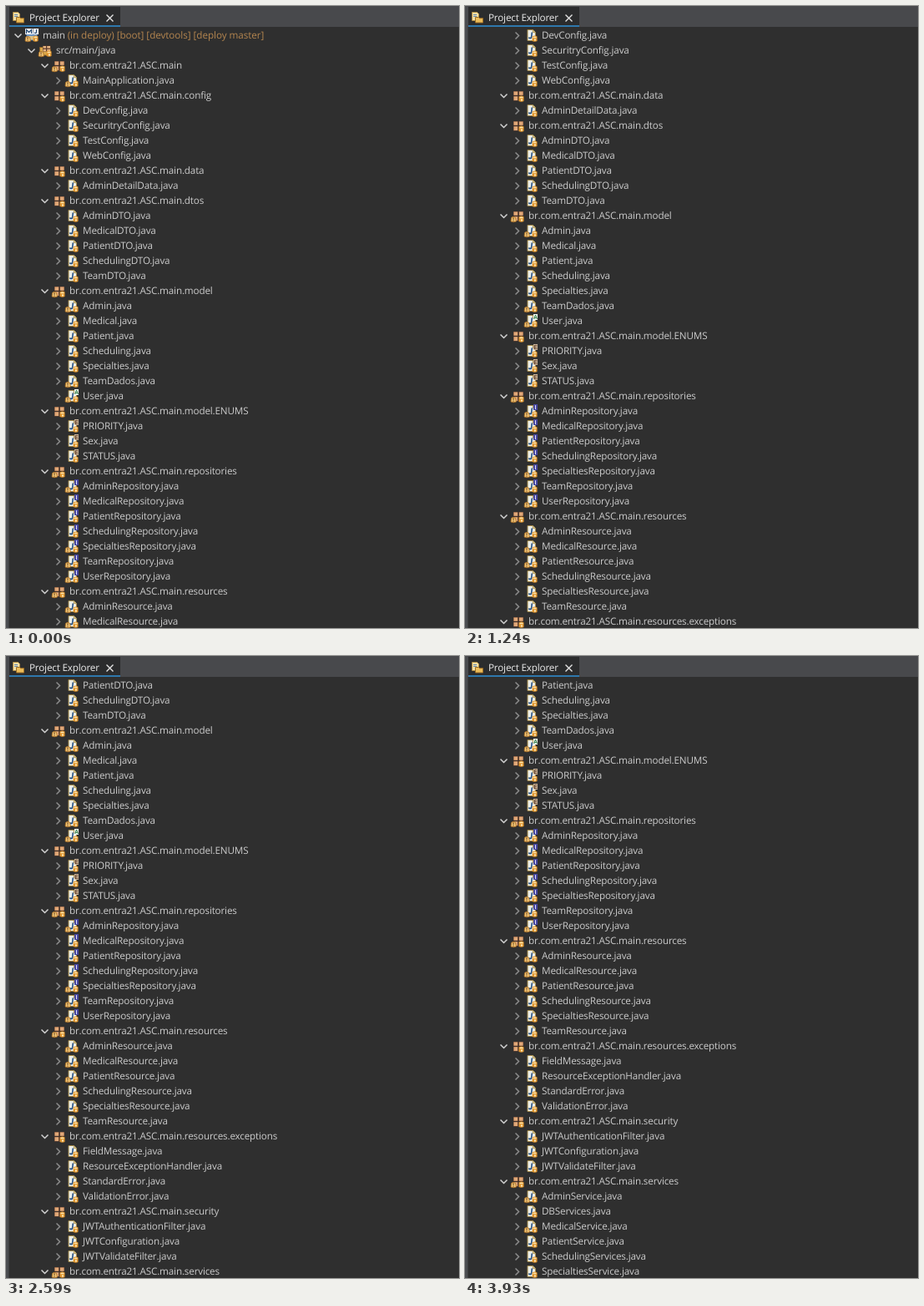
An HTML page for the animation above (8000 ms loop, 543 by 745 pixels).

```html
<!DOCTYPE html>
<html lang="en">
<head>
<meta charset="utf-8">
<title>Project Explorer</title>
<style>
  html, body { margin: 0; width: 100%; height: 100%; overflow: hidden; background: #2f2f2f; }
  svg { display: block; }
  text {
    font: 11.7px "Open Sans", "Noto Sans", sans-serif;
    letter-spacing: -.17px;
    text-rendering: geometricPrecision;
    fill: #cbcbcb;
    white-space: pre;
  }
  .decoration { fill: #b3854f; letter-spacing: -.06px; }
  .badge { font: bold 7px "Liberation Sans", Arial, sans-serif; letter-spacing: 0; }
  .open, .closed { fill: none; stroke: #d2d2d2; stroke-width: 1.5; }
  .closed { stroke: #8c8c8c; }
</style>
</head>
<body>
<svg width="543" height="745" viewBox="0 0 543 745">
  <defs>
    <clipPath id="view"><path d="M4 26H543V745H4z"/></clipPath>

    <g id="repo">
      <path d="M9.5 9.5q3-2 6 0v5.5q-3 1.5-6 0z" fill="#e0962f"/>
      <path d="M10.5 10q2-1 4 0v1.3h-4z" fill="#fbe3ac"/>
      <path d="M12 12.5h1.8v2H12z" fill="#fff0c8"/>
    </g>
    <g id="warning">
      <path d="M.5 10.5q2.5-2.5 5 0l1 4.5q-3.5 1.5-6.5 0z" fill="#f3c877" stroke="#a8691f" stroke-width=".8"/>
      <path d="M3 10.3v2.4m0 .8v1.2" stroke="#69401a" stroke-width="1.1"/>
    </g>
    <g id="package" fill="#e0a878">
      <path d="M3 3h12v11.5H3z" fill="#6e4431"/>
      <path d="M3.5 3.5h4.7v4.2H3.5zm6.3 0h4.7v4.2H9.8zM3.5 9.3h4.7v4.7H3.5zm6.3 0h4.7V14H9.8z"/>
      <path d="M9 2.5v12M2.5 8.5h13" stroke="#3b2e29" stroke-width="1"/>
    </g>
    <g id="file">
      <path d="M4 1.5h6.3l3.2 3.2v9.8H4z" fill="#eceee8" stroke="#a08748"/>
      <path d="M10.3 1.5v3.2h3.2" fill="#e6cf8a" stroke="#a08748" stroke-width=".8"/>
      <path d="M9.3 4.5L8.7 10q-.3 1.6-1.7 1.6-1.2 0-1.5-1" fill="none" stroke="#234f83" stroke-width="1.6"/>
    </g>
    <g id="source">
      <path d="M1.5 4.5h5l1.2 1.5h6.8v8h-13z" fill="#d9a84c" stroke="#8e6425"/>
      <path d="M5 2.5h9.5v7H5z" fill="#5b3a2b"/>
      <path d="M5.5 3H9v2.5H5.5zm4.7 0h3.8v2.5h-3.8zM5.5 6.7H9v2.5H5.5zm4.7 0h3.8v2.5h-3.8z" fill="#e6b582"/>
    </g>
    <g id="project">
      <path d="M1.5 6.5h5l1-1.5h7v9h-13z" fill="#6f94bd" stroke="#3d5f8a"/>
      <path d="M2 9h12v4.5H2z" fill="#d9c18a"/>
      <path d="M0 0h9v7H0zM9.5 0H16v7H9.5z" fill="#f4f6fa"/>
      <path d="M1.5 6V1.5l3 3 3-3V6M13.5 1v3.2q0 1.5-2.5 1" fill="none" stroke="#23476f" stroke-width="1.2"/>
    </g>
  </defs>

  <path d="M0 0H543V745H0z" fill="#2f2f2f"/>
  <path d="M0 0H543V25H0z" fill="#48494c"/>
  <path d="M0 0H3.5V745H0z" fill="#4a4c4f"/>
  <path d="M4 1H137V25H4z" fill="#2b2c2d"/>
  <path d="M4 23H137V25H4z" fill="#2f78ad"/>
  <path d="M8.5 7.5h6l2 2v8h-8z" fill="#f3dfa4" stroke="#b08b42"/>
  <path d="M10 10.5h4m-4 2h4" stroke="#6288b4"/>
  <path d="M12.5 13.5h4l1 1.2h4v5.3h-9z" fill="#edbd5a" stroke="#9a6d26"/>
  <text x="28" y="18" style="fill:#ececec">Project Explorer</text>
  <path d="M120.5 10.5l8 8m0-8l-8 8" stroke="#e2e2e2" stroke-width="1.4"/>

  <g clip-path="url(#view)"><g id="tree"></g></g>
</svg>
<script>
const ROW = 18, LOOP = 8000;
const PREFIX = 'br.com.entra21.ASC.main';

// A leading "!" marks an item that carries a warning.
const packages = `
!: !MainApplication
.config: DevConfig SecuritryConfig TestConfig WebConfig
.data: AdminDetailData
.dtos: AdminDTO MedicalDTO PatientDTO SchedulingDTO TeamDTO
!.model: !Admin Medical Patient Scheduling Specialties !TeamDados !User
.model.ENUMS: PRIORITY Sex STATUS
!.repositories: !AdminRepository MedicalRepository PatientRepository SchedulingRepository !SpecialtiesRepository !TeamRepository !UserRepository
!.resources: !AdminResource !MedicalResource !PatientResource SchedulingResource SpecialtiesResource TeamResource
.resources.exceptions: FieldMessage ResourceExceptionHandler StandardError ValidationError
.security: JWTAuthenticationFilter JWTConfiguration JWTValidateFilter
!.services: !AdminService DBServices !MedicalService PatientService SchedulingServices SpecialtiesService`;

// [time in ms, first visible row]
const scrollSteps = [
  [0, 0], [500, 1], [650, 2], [800, 3], [1090, 4], [1240, 5],
  [1540, 6], [1830, 7], [1980, 8], [2130, 10], [2280, 11], [2430, 12],
  [2590, 14], [2740, 15], [2890, 16], [3190, 18], [3340, 19], [3930, 20]
];

// letter: [ink, paper]
const badges = {
  E: ['#5e3a22', '#cdb9a0'],
  I: ['#e4e4fa', '#44449e'],
  A: ['#1f7038', '#f2f8f2']
};

const rows = [];

function badgeMarkup(letter) {
  if (!letter) return '';
  const [ink, paper] = badges[letter];
  return `<path d="M11 0h5v7h-5z" fill="${paper}"/>
    <text class="badge" x="13.5" y="6" text-anchor="middle" style="fill:${ink}">${letter}</text>`;
}

function addRow(level, icon, label, warned, badge) {
  const left = 16 * level;
  const chevron = icon === 'file'
    ? '<path class="closed" d="M12.5 5.5l4 4-4 4"/>'
    : '<path class="open" d="M10.5 7.5l4 4 4-4"/>';
  rows.push(`<g transform="translate(${left} ${26 + ROW * rows.length})">
    ${chevron}
    <g transform="translate(23 1)">
      <use href="#${icon}"/><use href="#repo"/>
      ${warned ? '<use href="#warning"/>' : ''}${badgeMarkup(badge)}
    </g>
    <text x="44" y="13">${label}</text>
  </g>`);
}

addRow(0, 'project',
  'main <tspan class="decoration">(in deploy) [boot] [devtools] [deploy master]</tspan>', true);
addRow(1, 'source', 'src/main/java', true);

for (const line of packages.trim().split('\n')) {
  const [head, files] = line.split(': ');
  const suffix = head.replace('!', '');
  addRow(2, 'package', PREFIX + suffix, head.startsWith('!'));
  for (const entry of files.split(' ')) {
    const name = entry.replace('!', '');
    const badge = suffix.endsWith('ENUMS') ? 'E'
      : suffix === '.repositories' ? 'I'
      : name === 'User' ? 'A' : '';
    addRow(3, 'file', name + '.java', entry.startsWith('!'), badge);
  }
}

const tree = document.getElementById('tree');
tree.innerHTML = rows.join('');

const start = performance.now();
function draw(now) {
  const time = Math.max(0, now - start) % LOOP;
  const [, firstRow] = scrollSteps.findLast(([from]) => time >= from);
  tree.setAttribute('transform', `translate(0 ${-ROW * firstRow})`);
  requestAnimationFrame(draw);
}
draw(start);
</script>
</body>
</html>
```
